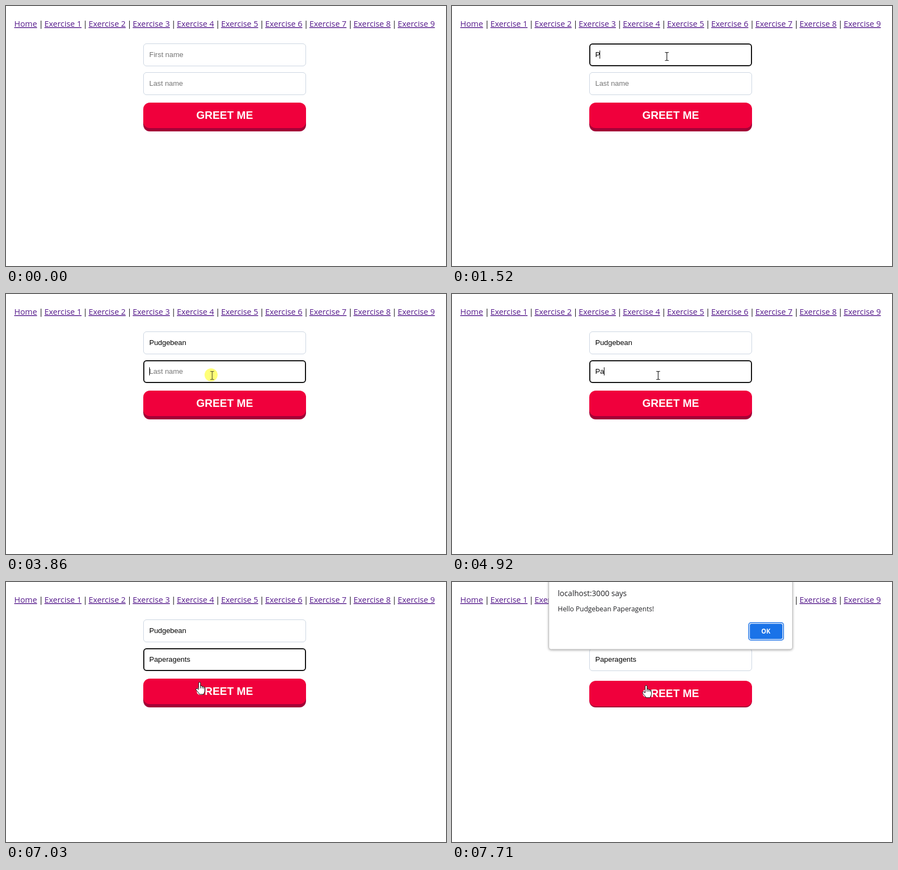
Write an HTML page that moves like this. It is 811 by 479 pixels and loops after 8 s.

```html
<!DOCTYPE html>
<html lang="en">
<head>
<meta charset="utf-8">
<title>Greeting form</title>
<style>
  html, body { margin: 0; width: 100%; height: 100%; overflow: hidden; background: #fff; }
  svg { display: block; width: 100%; height: 100%; }
  text { white-space: pre; }
  .ui { font-family: "Open Sans", "Noto Sans", sans-serif; }
  .nav { font-size: 14.85px; fill: #111; }
  .nav .link { fill: #551a8b; text-decoration: underline; }
  .field, .label { font-family: "Liberation Sans", Arial, sans-serif; }
  .field { font-size: 13.333px; }
  .label { font-size: 20px; font-weight: bold; fill: #fff; text-anchor: middle; }
  .box { fill: #fff; stroke: #cbd5e1; }
  .focused .box { stroke: #101010; stroke-width: 2; }
  .beam { fill: none; stroke: #1a1a1a; stroke-width: 1.2; }
  .arrow, .hand { fill: #fff; stroke: #000; stroke-linejoin: round; }
  .panel { fill: #fff; stroke: #c4c4c4; filter: drop-shadow(0 1px 2px rgba(0, 0, 0, .35)); }
</style>
</head>
<body>
<svg viewBox="0 0 811 479">
  <g id="nav" class="ui nav"></g>
  <g id="fields"></g>

  <rect x="253" y="184" width="300" height="47" rx="12" fill="#a30036"/>
  <g id="front">
    <rect x="253" y="178" width="300" height="47" rx="12" fill="#f0003c"/>
    <text class="label" x="403" y="208">GREET ME</text>
  </g>

  <g id="dialog">
    <path class="panel" d="M178.5 -2 V120 a4 4 0 0 0 4 4 H623.5 a4 4 0 0 0 4 -4 V-2 Z"/>
    <g class="ui" fill="#202124">
      <text x="195" y="26" font-size="14.1">localhost:3000 says</text>
      <text id="greeting" x="195" y="54" font-size="12.4"></text>
      <rect x="547" y="75" width="64" height="32" rx="4" fill="#fff" stroke="#4a8fec" stroke-width="2"/>
      <rect x="549" y="77" width="60" height="28" rx="3" fill="#1a73e8"/>
      <text x="578.5" y="95" font-size="11.5" font-weight="700" fill="#fff" text-anchor="middle">OK</text>
    </g>
  </g>

  <circle id="click" r="12" fill="#ffff78"/>
  <g id="cursor">
    <path class="beam" d="M-3.5 -7.5 H-1 L0 -6.5 L1 -7.5 H3.5 M0 -6.5 V6.5 M-3.5 7.5 H-1 L0 6.5 L1 7.5 H3.5"/>
    <path class="arrow" d="M.5 .5 V16.5 L4.2 13 L6.6 18.5 L9 17.5 L6.6 12.2 H11.8 Z"/>
    <g class="hand" transform="translate(-8 0)">
      <path d="M6 14 V2.4 a1.8 1.8 0 0 1 3.6 0 V8.2 a1.7 1.7 0 0 1 3.2 .7 a1.6 1.6 0 0 1 2.7 .8 a1.3 1.3 0 0 1 2 1.2 V16 c0 3 -1.6 4 -2 7 H7.5 C6.5 20 3.5 18 1.2 14.5 C.4 12.8 2.5 11.4 4 12.7 Z"/>
      <path fill="none" d="M9.6 8.2 V12 M12.8 8.9 V12 M15.5 9.7 V12.5"/>
    </g>
  </g>
</svg>
<script>
const LOOP = 8000, BLINK = 520;
const $ = id => document.getElementById(id);

function add(parent, tag, attrs, text = '') {
  const node = document.createElementNS('http://www.w3.org/2000/svg', tag);
  for (const key in attrs) node.setAttribute(key, attrs[key]);
  node.textContent = text;
  return parent.appendChild(node);
}
const show = (node, on) => node.setAttribute('visibility', on ? 'visible' : 'hidden');
const place = (node, x, y) => node.setAttribute('transform', `translate(${x} ${y})`);

// Navigation bar
const PITCH = 81.4;
add($('nav'), 'text', { class: 'link', x: 15.2, y: 38 }, 'Home');
for (let i = 0; i < 9; i++) {
  add($('nav'), 'text', { x: 64.7 + PITCH * i, y: 38, 'text-anchor': 'middle' }, '|');
  add($('nav'), 'text', { class: 'link', x: 70.8 + PITCH * i, y: 38 }, `Exercise ${i + 1}`);
}

// Form fields with the moment of each keystroke
const fields = [
  { y: 69, hint: 'First name', value: 'Pudgebean', focus: 660, blur: 3860,
    keys: [1520, 1720, 1930, 2060, 2190, 2460, 2660, 2790, 2920] },
  { y: 122, hint: 'Last name', value: 'Paperagents', focus: 3860, blur: 7370,
    keys: [4590, 4920, 5180, 5310, 5380, 5510, 5850, 5980, 6110, 6310, 6440] },
];
for (const f of fields) {
  f.group = add($('fields'), 'g', { class: 'field', transform: `translate(253 ${f.y})` });
  f.box = add(f.group, 'rect', { class: 'box' });
  f.text = add(f.group, 'text', { x: 11, y: 25 });
  f.caret = add(f.group, 'rect', { y: 13, width: 1, height: 15 });
}
$('greeting').textContent = `Hello ${fields.map(f => f.value).join(' ')}!`;

function drawField(f, t) {
  const focused = t >= f.focus && t < f.blur;
  const count = f.keys.filter(k => k <= t).length;
  const inset = focused ? 1 : .5;
  f.group.classList.toggle('focused', focused);
  for (const [key, v] of Object.entries({ x: inset, y: inset, width: 300 - 2 * inset, height: 42 - 2 * inset, rx: 6 - inset }))
    f.box.setAttribute(key, v);
  f.text.textContent = count ? f.value.slice(0, count) : f.hint;
  f.text.setAttribute('fill', count ? '#000' : '#757575');
  const lastInput = count ? f.keys[count - 1] : f.focus;
  show(f.caret, focused && t - lastInput < BLINK);
  f.caret.setAttribute('x', 11 + (count ? Math.floor(f.text.getComputedTextLength()) : 0));
}

// Pointer: [start, shape, x, y], held until the next entry
const moves = [
  [0, '', 0, 0],
  [70, 'arrow', 671, 446], [130, 'arrow', 583, 315], [190, 'hand', 516, 206],
  [260, 'beam', 458, 130], [320, 'beam', 421, 72],
  [470, 'beam', 408, 77], [530, 'beam', 397, 83], [860, 'beam', 396, 93],
  [3520, 'beam', 395, 97], [3590, 'beam', 391, 107], [3650, 'beam', 384, 134], [3720, 'beam', 380, 150],
  [6900, 'beam', 376, 156], [6970, 'arrow', 364, 174], [7030, 'hand', 357, 184],
  [7170, 'hand', 357, 187], [7230, 'hand', 358, 190],
];
const clicks = [[660, 790], [3860, 3920], [7370, 7500]];
const shapes = [...$('cursor').children];

function drawPointer(t) {
  const [, shape, x, y] = moves.findLast(m => m[0] <= t);
  const clicking = clicks.some(([from, to]) => t >= from && t < to);
  for (const node of shapes) show(node, node.classList.contains(shape));
  place($('cursor'), x, y);
  $('cursor').setAttribute('opacity', clicking && shape === 'beam' ? .75 : 1);
  place($('click'), x - 2, y - 1);
  show($('click'), clicking);
}

function render(t) {
  fields.forEach(f => drawField(f, t));
  place($('front'), 0, t < 7370 ? 0 : t < 7430 ? 2 : 4);
  $('dialog').setAttribute('opacity', t < 7580 ? 0 : t < 7710 ? .6 : 1);
  drawPointer(t);
}

const start = performance.now();
function tick() {
  render((performance.now() - start) % LOOP);
  requestAnimationFrame(tick);
}
tick();
</script>
</body>
</html>
```
